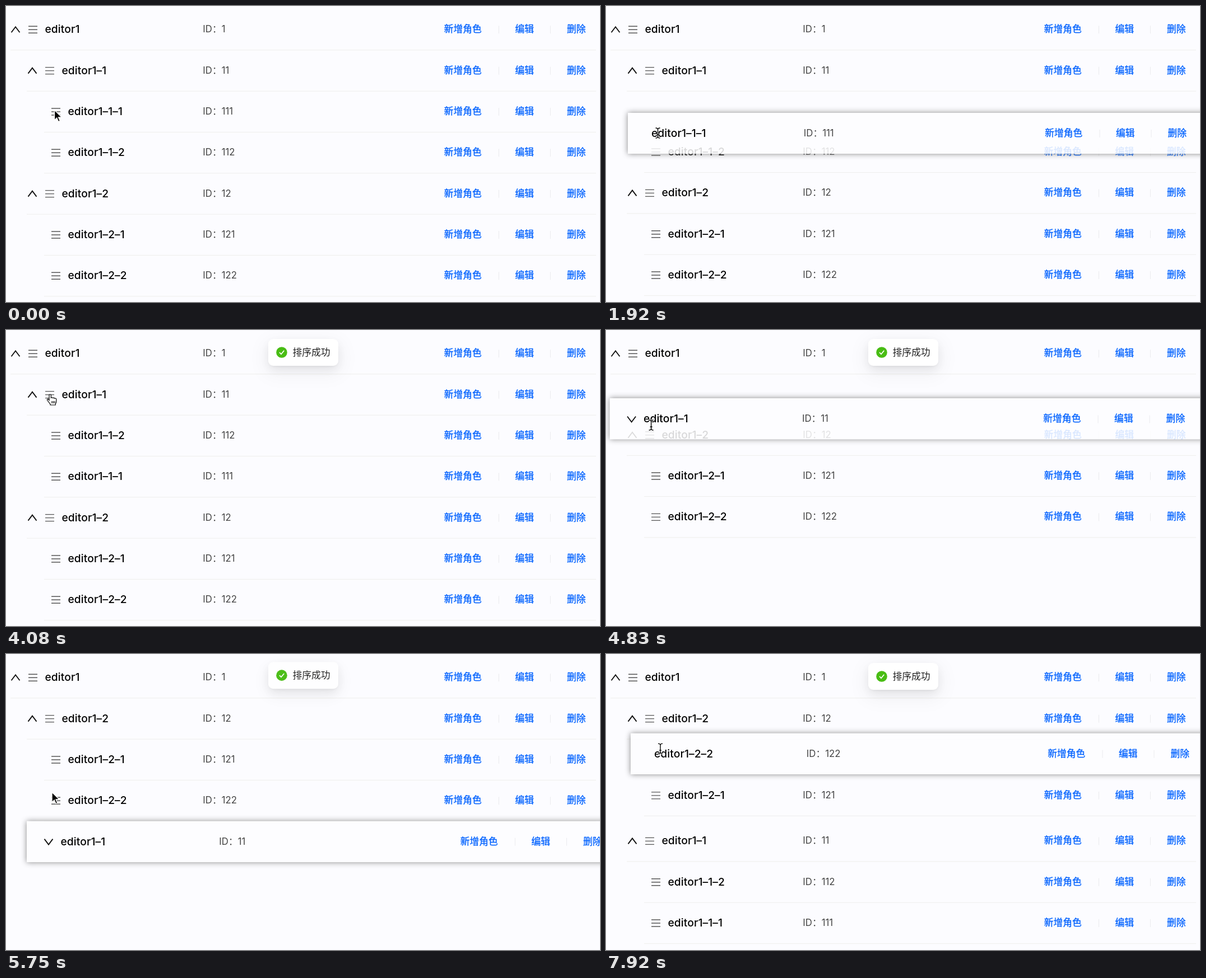
An HTML page that plays this animation: 1060x529 px, repeating every 8 s.

```html
<!DOCTYPE html>
<html lang="zh-CN">
<head>
<meta charset="utf-8">
<style>
  html, body { margin: 0; width: 100%; height: 100%; overflow: hidden; background: #fcfcff; }
  body { position: relative; }
  body > *, .row > * { position: absolute; white-space: nowrap; }
  .row { left: 0; top: 0; width: 1060px; height: 73.33px; line-height: 73.33px;
    font: 16.8px/73.33px Inter, "Noto Sans CJK SC", sans-serif; color: #444; }
  .name { top: 0; font-size: 19.2px; font-weight: 450; letter-spacing: .1px; color: #000; }
  .id { top: 0; }
  .link { top: -1px; font-family: "Noto Sans CJK SC", sans-serif; color: #0062ff; -webkit-text-stroke: .3px #0062ff; }
  .bar { top: 30px; width: 1px; height: 14px; background: #ebebee; }
  .line { top: 72.7px; right: 7px; height: 1px; background: #eeeeec; }
  .card { width: 1100px; background: rgba(254, 254, 255, .85); box-shadow: 0 0 10px #888; }
  svg { overflow: visible; fill: none; }
  #toast { left: 468px; top: 16px; width: 125px; height: 48px; border-radius: 9px; background: #fff;
    box-shadow: 0 7px 19px rgba(0, 0, 0, .08), 0 3px 7px -4px rgba(0, 0, 0, .12), 0 10px 33px 9px rgba(0, 0, 0, .04); }
  #toast span { position: absolute; left: 43.5px; top: -1px; color: #1f1f1f;
    font: 16.8px/48px "Noto Sans CJK SC", sans-serif; }
  #toast svg { position: absolute; left: 24px; top: 24px; }
  #cursor { left: 0; top: 0; }
</style>
</head>
<body>
<div id="toast">
  <svg width="1" height="1"><circle r="9.8" fill="#49bd14"/><path d="M-4 0L-1 3.2 4.2-3.2" stroke="#fff" stroke-width="1.7"/></svg>
  <span>排序成功</span>
</div>
<svg id="cursor" width="1" height="1">
  <path id="arrow" transform="scale(1.12)" d="M0 0V16L3.7 12.5 6.2 18.3 8.8 17.2 6.3 11.5H11.5Z" fill="#000" stroke="#fff" stroke-width="1.2"/>
  <path id="hand" d="M-2 9V1q0-2 1.7-2t1.7 2V6q0-1.5 1.6-1.5t1.7 1.8q0-1.2 1.5-1.2t1.6 1.7q.2-.8 1.5-.8t1.5 1.8V12q0 2-1.5 4V18H0V16.5L-5 10q-1.2-1.8 0-2.5t3 2zM3 11v4M5.5 11v4M8 11v4" fill="#fff" stroke="#000" stroke-width="1.2"/>
  <g id="beam">
    <path d="M-4-9Q0-9 0-6V6Q0 9-4 9M4-9Q0-9 0-6M0 6Q0 9 4 9M-2 3H2" stroke="#fff" stroke-width="3"/>
    <path d="M-4-9Q0-9 0-6V6Q0 9-4 9M4-9Q0-9 0-6M0 6Q0 9 4 9M-2 3H2" stroke="#000" stroke-width="1.4"/>
  </g>
</svg>
<script>
const LOOP = 8000, STEP = 1000 / 12, ROW = 220 / 3, TOP = 5.3, GAP = 72.1;
const $ = id => document.getElementById(id);
const clamp = v => Math.max(0, Math.min(1, v));
const mix = (a, b, p) => a + (b - a) * p;

function bezier(x1, y1, x2, y2) {
  const curve = (a, b, s) => 3 * a * s * (1 - s) ** 2 + 3 * b * s * s * (1 - s) + s ** 3;
  return x => {
    let lo = 0, hi = 1;
    for (let i = 0; i < 20; i++) {
      const mid = (lo + hi) / 2;
      if (curve(x1, x2, mid) < x) lo = mid; else hi = mid;
    }
    return curve(y1, y2, lo);
  };
}
const slide = bezier(.2, 0, 0, 1), settle = bezier(.2, 1, .1, 1);

const icon = (x, path, color, width) =>
  `<svg style="left:${x}px;top:36.7px" width="1" height="1"><path d="${path}" stroke="${color}" stroke-width="${width}"/></svg>`;

// A card is a lifted row: moved left, without its handle, folded.
function makeRow(id, card) {
  const depth = id.length - 1;
  const shift = card ? [0, -8, -38][depth] : 0;
  const nameX = [69.5, 99.5, 110.5][depth] + shift - (card ? 31 : 0);
  const at = x => `style="left:${x + shift}px"`;
  const el = document.createElement('div');
  el.className = card ? 'row card' : 'row';
  el.innerHTML =
    (depth < 2 ? icon([17, 47][depth] + shift, card ? 'M-7.5-5L0 5 7.5-5' : 'M-7.5 5L0-5 7.5 5', '#111', 1.9) : '') +
    (card ? '' : icon([40, 70, 81][depth], 'M0-6H16M0 0H16M0 6H16', '#555', 1.4)) +
    `<span class="name" style="left:${nameX}px">editor${[...id].join('–')}</span>` +
    `<span class="id" ${at(351.3)}>ID：${id}</span>` +
    `<span class="link" ${at(781.7)}>新增角色</span><i class="bar" ${at(879)}></i>` +
    `<span class="link" ${at(908.5)}>编辑</span><i class="bar" ${at(971)}></i>` +
    `<span class="link" ${at(1001)}>删除</span>` +
    (card ? '' : `<i class="line" style="left:${[8, 37, 68][depth]}px"></i>`);
  document.body.insertBefore(el, $('toast'));
  return el;
}

const rows = {}, cards = {};
const START = '1 11 111 112 12 121 122', END = '1 12 121 122 11 112 111';
for (const id of START.split(' ')) rows[id] = makeRow(id);

// Lifted rows: grab offset from the pointer, drop time and resting place.
const drags = {
  111: { dx: 53, dy: 36, drop: 2400, x: 67, slot: 3 },
  11: { dx: 74, dy: 47.5, drop: 5480, x: 37, slot: 4 },
  122: { dx: 52.5, dy: 27.5, drop: 9000, x: 67, slot: 2 }
};
for (const id in drags) cards[id] = makeRow(id, true);

const phases = [
  { from: 0, order: START },
  { from: 1410, order: START, drag: '111', moved: ['112'], dir: -1, at: 2000 },
  { from: 2570, order: '1 11 112 111 12 121 122', drag: '111' },
  { from: 2790, order: '1 11 112 111 12 121 122' },
  { from: 4240, order: '1 11 12 121 122', drag: '11', moved: ['12', '121', '122'], dir: -1, at: 4965 },
  { from: 5570, order: '1 12 121 122 11', drag: '11' },
  { from: 5820, order: END },
  { from: 7410, order: END, drag: '122', moved: ['121'], dir: 1, at: 7814 }
];

const path = [
  [0, 86.5, 186], [500, 117, 206], [667, 118, 207], [1250, 91, 188], [1667, 91, 188],
  [1917, 92.5, 227], [2250, 95, 239], [3167, 95, 239], [3500, 98, 215], [3750, 66, 160],
  [4000, 79, 116], [4084, 79, 116], [4250, 81, 126], [4667, 81, 126], [5083, 80, 236],
  [5333, 82, 247], [6333, 82, 247], [7167, 93, 260], [7250, 91, 257], [7583, 91, 257],
  [7667, 91, 255], [7750, 91, 255], [7917, 97, 169], [8000, 97, 169]
];
const shapes = [[0, 'arrow'], [1160, 'hand'], [1410, 'beam'], [2410, 'arrow'], [3910, 'hand'],
  [4240, 'beam'], [5490, 'arrow'], [7240, 'hand'], [7660, 'beam']];

function pointer(t) {
  const i = path.findIndex(k => k[0] > t);
  const a = path[i - 1], b = path[i], p = (t - a[0]) / (b[0] - a[0]);
  return [mix(a[1], b[1], p), mix(a[2], b[2], p)];
}

const place = (el, x, y) => { el.style.transform = `translate(${x}px,${y}px)`; };
const show = (el, on) => { el.style.display = on ? '' : 'none'; };

function drawRows(t, [px, py]) {
  const phase = phases.findLast(p => p.from <= t);
  const order = phase.order.split(' '), lifted = order.indexOf(phase.drag);
  const push = phase.moved ? slide(clamp((t - phase.at) / 200)) * GAP * phase.dir : 0;
  for (const id in rows) {
    const i = order.indexOf(id);
    show(rows[id], i >= 0 && id !== phase.drag);
    let y = TOP + i * ROW;
    if (phase.moved) {
      if (i > lifted) y -= ROW - GAP;
      if (phase.moved.includes(id)) y += push;
    }
    place(rows[id], 0, y);
  }
  for (const id in cards) {
    const d = drags[id], p = settle(clamp((t - d.drop) / 330));
    show(cards[id], id === phase.drag);
    place(cards[id], mix(px - d.dx, d.x, p), mix(py - d.dy, TOP + d.slot * ROW, p));
  }
}

function drawToast(t) {
  const p = clamp((t - (t < 5600 ? 2530 : 5522)) / 300);
  const e = Math.sqrt(1 - (1 - p) ** 2);
  place($('toast'), 0, -64 * (1 - e));
  $('toast').style.opacity = e;
}

function draw(t) {
  const pos = pointer(t);
  drawRows(t, pos);
  drawToast(t);
  place($('cursor'), ...pos);
  const shape = shapes.findLast(s => s[0] <= t)[1];
  for (const id of ['arrow', 'hand', 'beam']) show($(id), id === shape);
}

const begin = performance.now();
function tick() {
  const t = (performance.now() - begin) % LOOP;
  draw(Math.floor((t + 5) / STEP) * STEP % LOOP);
  requestAnimationFrame(tick);
}
tick();
</script>
</body>
</html>
```
